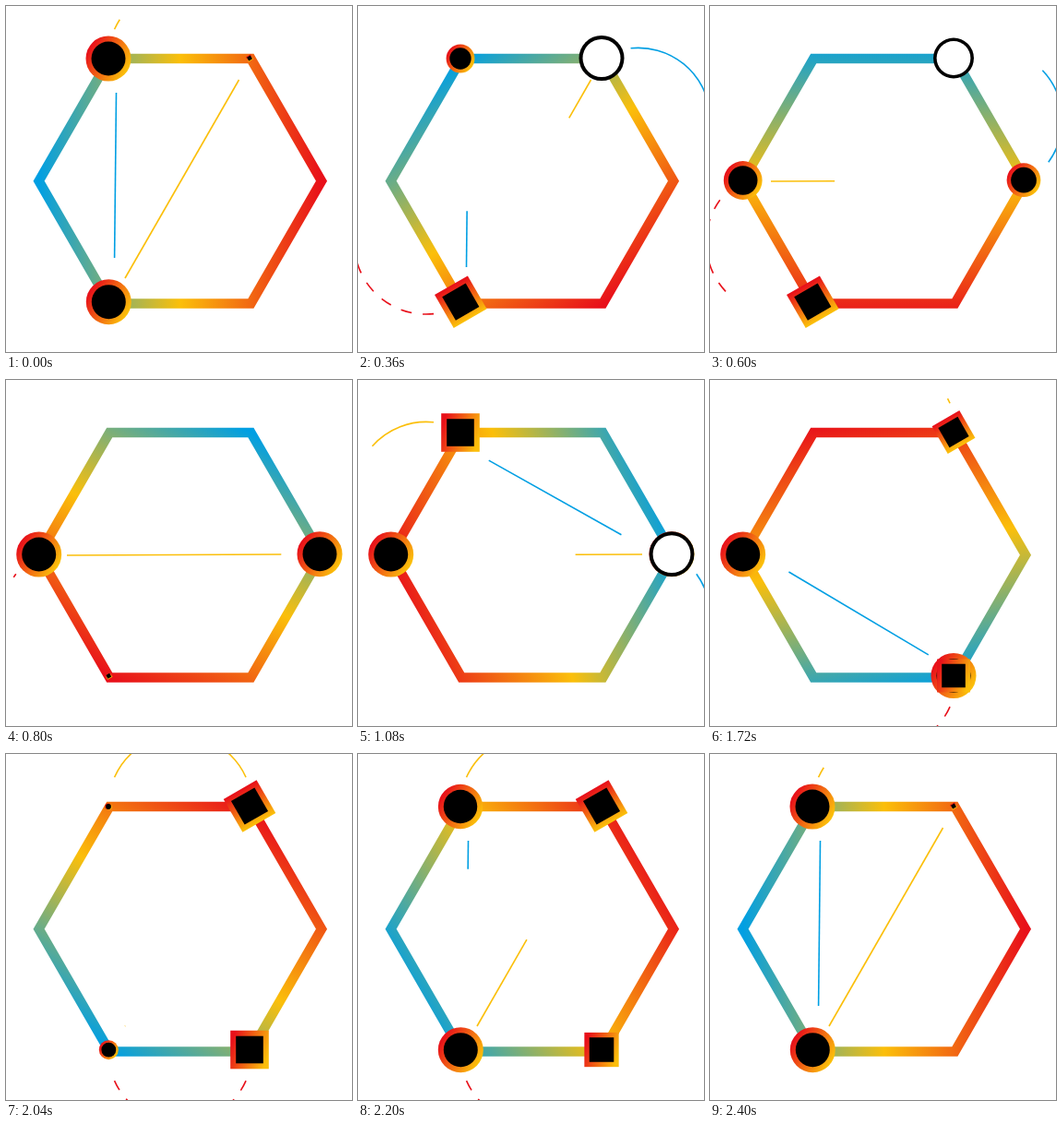
An HTML page with a canvas for the animation above (2.44 s loop, 375x375 px).

```html
<!DOCTYPE html>
<html lang="en">
<head>
<meta charset="utf-8">
<title>Hexagon network</title>
<style>
html, body { margin: 0; width: 100%; height: 100%; overflow: hidden; background: #fff; }
canvas { display: block; width: 375px; height: 375px; }
</style>
</head>
<body>
<canvas id="stage" width="375" height="375"></canvas>
<script>
const ctx = document.getElementById('stage').getContext('2d');
const BLUE = '#009fe3', YELLOW = '#fbbf0a', RED = '#e8101a';
const LOOP = 2440, TURN = 2400, STEP = 40, RAMP = 240;
const CX = 188.8, CY = 189.7, R = 153.2;
const rad = deg => deg * Math.PI / 180;
const clamp = x => Math.max(0, Math.min(1, x));
const ease = x => (1 - Math.cos(Math.PI * clamp(x))) / 2;

const spots = {
  tl: [111, 57], tr: [264, 56.5], r: [340, 188.7],
  br: [264, 320.5], bl: [111.3, 320.7], l: [35.7, 189]
};

// spot, shape, birth, death
const nodes = [
  ['tl', 'circle', 1978, 2900],
  ['bl', 'circle', 1931, 2800],
  ['bl', 'tilted', 10, 860],
  ['tr', 'tilted', 1545, 2460],
  ['tr', 'ring', 10, 790],
  ['l', 'circle', 420, 1330],
  ['l', 'circle', 1142, 2030],
  ['r', 'circle', 440, 1340],
  ['r', 'ring', 850, 1710],
  ['tl', 'square', 810, 1710],
  ['br', 'circle', 1150, 2010],
  ['br', 'square', 1538, 2390]
];

const line = (x1, y1, x2, y2) => ({
  len: Math.hypot(x2 - x1, y2 - y1),
  trace(a, b) {
    ctx.moveTo(x1 + (x2 - x1) * a, y1 + (y2 - y1) * a);
    ctx.lineTo(x1 + (x2 - x1) * b, y1 + (y2 - y1) * b);
  }
});

// Arc bulging outwards from the edge that faces the given direction
const arc = (facing, dir) => {
  const f = rad(facing), half = rad(66), r = 78;
  const x = CX + 132.7 * Math.cos(f), y = CY + 132.7 * Math.sin(f);
  const at = p => f + dir * half * (2 * p - 1);
  return {
    len: 2 * half * r,
    trace(a, b) { ctx.arc(x, y, r, at(a), at(b), dir < 0); }
  };
};

// path, colour, head start, head end, tail start, tail end
const links = [
  [line(119.5, 94, 117.5, 283), BLUE, 2110, 2450, 2500, 2922],
  [line(129, 295, 252.5, 80), YELLOW, 2030, 2400, 2440, 2890],
  [arc(-30, 1), BLUE, 80, 440, 450, 795],
  [arc(150, 1), RED, 60, 460, 440, 840],
  [line(66, 190, 308, 189), YELLOW, 460, 850, 840, 1220],
  [line(302, 177, 138, 85), BLUE, 800, 1110, 1010, 1350],
  [arc(30, 1), BLUE, 960, 1320, 1310, 1690],
  [arc(210, -1), YELLOW, 920, 1280, 1280, 1690],
  [line(72, 200, 237, 298), BLUE, 1290, 1730, 1650, 2030],
  [arc(270, -1), YELLOW, 1680, 2030, 2050, 2470],
  [arc(90, 1), RED, 1620, 1990, 2040, 2390]
];

function ramp(x1, y1, x2, y2, ...colours) {
  const g = ctx.createLinearGradient(x1, y1, x2, y2);
  colours.forEach((c, i) => g.addColorStop(i / (colours.length - 1), c));
  return g;
}

function hexagon(t) {
  const a = rad(180 + 360 * t / TURN);
  const dx = R * Math.cos(a), dy = R * Math.sin(a);
  ctx.beginPath();
  for (let i = 0; i < 6; i++) {
    ctx.lineTo(CX + R * Math.cos(rad(60 * i)), CY + R * Math.sin(rad(60 * i)));
  }
  ctx.closePath();
  ctx.lineWidth = 10.5;
  ctx.strokeStyle = ramp(CX + dx, CY + dy, CX - dx, CY - dy, BLUE, YELLOW, RED);
  ctx.stroke();
}

function link([path, colour, h0, h1, t0, t1], t) {
  const head = ease((t - h0) / (h1 - h0)), tail = ease((t - t0) / (t1 - t0));
  if (head <= tail) return;
  ctx.save();
  if (colour === RED) {
    ctx.setLineDash([12, 12]);
    ctx.lineDashOffset = tail * path.len;
  }
  ctx.lineWidth = 1.6;
  ctx.strokeStyle = colour;
  ctx.beginPath();
  path.trace(tail, head);
  ctx.stroke();
  ctx.restore();
}

function disc(r, fill) {
  ctx.beginPath();
  ctx.arc(0, 0, r, 0, 2 * Math.PI);
  ctx.fillStyle = fill;
  ctx.fill();
}

function box(h, fill) {
  ctx.fillStyle = fill;
  ctx.fillRect(-h, -h, 2 * h, 2 * h);
}

function node([spot, shape, birth, death], t) {
  const s = Math.min(ease((t - birth) / RAMP), ease((death - t) / RAMP));
  if (s <= 0) return;
  ctx.save();
  ctx.translate(...spots[spot]);
  ctx.scale(s, s);
  if (shape === 'ring') {
    disc(24.5, '#000');
    disc(20.5, '#fff');
  } else if (shape === 'circle') {
    disc(24.5, ramp(-20, -12, 20, 12, RED, YELLOW));
    disc(18.5, '#000');
  } else if (shape === 'tilted') {
    ctx.rotate(rad(-30));
    box(20.7, ramp(0, -20, 0, 20, RED, YELLOW));
    box(14.7, '#000');
  } else {
    box(20.8, ramp(-20, -7, 20, 7, RED, YELLOW));
    box(14.8, '#000');
  }
  ctx.restore();
}

function draw(now) {
  const t = Math.min(TURN, Math.floor(now % LOOP / STEP) * STEP) % TURN;
  ctx.fillStyle = '#fff';
  ctx.fillRect(0, 0, 375, 375);
  hexagon(t);
  // The second pass carries parts that live across the loop seam
  for (const u of [t + TURN, t]) {
    links.forEach(l => link(l, u));
    nodes.forEach(n => node(n, u));
  }
}

const start = performance.now();
function tick() {
  draw(performance.now() - start);
  requestAnimationFrame(tick);
}
tick();
</script>
</body>
</html>
```
